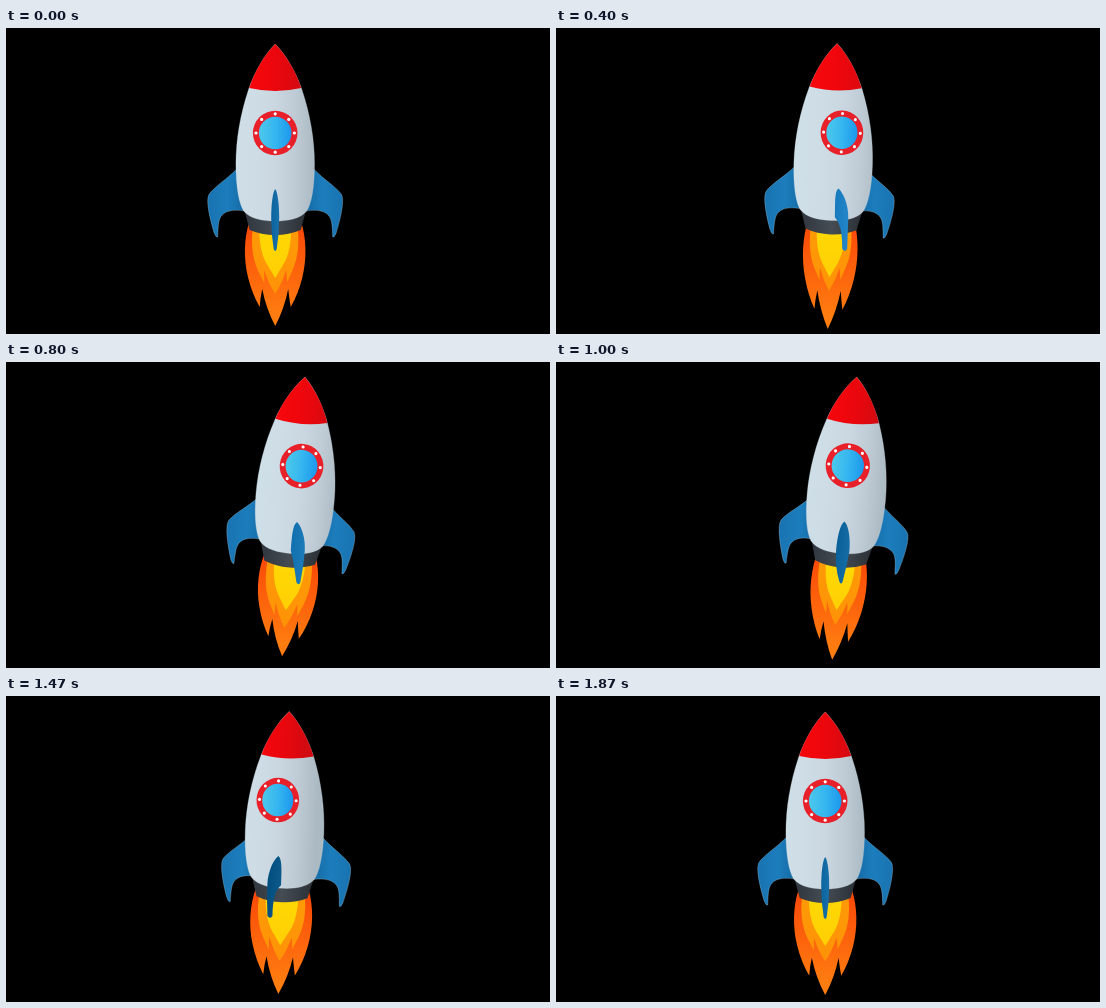
Animation of 544x306 px, one loop 1.94 s. Source, as an HTML page with a canvas:

```html
<!DOCTYPE html>
<html lang="en">
<head>
<meta charset="utf-8">
<title>Rocket</title>
<style>
html, body { margin: 0; width: 100%; height: 100%; overflow: hidden; background: #000; }
canvas { display: block; }
</style>
</head>
<body>
<canvas id="stage" width="544" height="306"></canvas>
<script>
const ctx = document.getElementById('stage').getContext('2d');
const LOOP = 1940, LAST = 28, TURN = 28.6;
const EDGE = 'rgba(205,220,230,.45)';

// Shapes are drawn around x = 0, the rocket's axis.
const hull = new Path2D('M0 16C-11 27-21 45-26.5 61C-35 86-39.3 112-39.3 136C-39.3 160-36 176-31.5 183C-25 191-12 193 0 193C12 193 25 191 31.5 183C36 176 39.3 160 39.3 136C39.3 112 35 86 26.5 61C21 45 11 27 0 16Z');
const nose = new Path2D('M0 16C-11 27-21 44-26 60Q0 66 26 60C21 44 11 27 0 16Z');
const skirt = new Path2D('M-31 182L-25.5 202Q-14 207 0 207Q14 207 25.5 202L31 182Z');
const wing = new Path2D('M-28 134L-38.5 141C-48 151-60 158-66 166C-70 172-65 192-61 205Q-59 210-57.5 209C-57 198-57 191-53 187C-48 182-40 181-24 184Z');
const flames = [
  ['M-26 194C-31 210-32 230-27 250Q-23 266-15.5 279Q-15 270-13 261Q-9 281 0 298Q9 281 13 261Q14 270 15.5 279Q23 266 27 250C32 230 31 210 26 194Z', '#fa4a08', '#ff7c10'],
  ['M-22 196C-24 212-24 228-17 243L-11 255L-11 242Q-7 255 0 266Q7 255 11 242L12 254L17 243C24 228 24 212 22 196Z', '#ff9a06', '#ff9008'],
  ['M-16 198C-16 214-14 226-9 235L0 250L9 235C14 226 16 214 16 198Z', '#ffd904', '#ffc806']
].map(([d, top, low]) => [new Path2D(d), top, low]);

// Flame flicker: step, width factor, tip height
const flicker = [[0, 1, 298], [6, .9, 301], [9, 1.05, 291], [15, .92, 298],
  [19, 1.08, 287], [22, 1.02, 298], [24, .98, 301], [28, 1.03, 299]];

function flameAt(n) {
  let i = 0;
  while (i < flicker.length - 2 && flicker[i + 1][0] <= n) i++;
  const a = flicker[i], b = flicker[i + 1];
  const k = (1 - Math.cos(Math.PI * (n - a[0]) / (b[0] - a[0]))) / 2;
  return [a[1] + (b[1] - a[1]) * k, a[2] + (b[2] - a[2]) * k];
}

function shade(x0, y0, x1, y1, ...stops) {
  const g = ctx.createLinearGradient(x0, y0, x1, y1);
  stops.forEach((c, i) => g.addColorStop(i / (stops.length - 1), c));
  return g;
}

function fill(path, paint, edge) {
  ctx.fillStyle = paint;
  ctx.fill(path);
  if (edge) {
    ctx.strokeStyle = EDGE;
    ctx.lineWidth = .6;
    ctx.stroke(path);
  }
}

function at(x, y, sx, sy, draw) {
  ctx.save();
  ctx.translate(x, y);
  ctx.scale(sx, sy);
  draw();
  ctx.restore();
}

function oval(x, y, rx, ry, paint) {
  ctx.beginPath();
  ctx.ellipse(x, y, rx, ry, 0, 0, 2 * Math.PI);
  ctx.fillStyle = paint;
  ctx.fill();
}

function porthole(x, squash) {
  at(x, 105, squash, 1, () => {
    oval(0, 0, 22.3, 22.3, '#e8202a');
    for (let i = 0; i < 8; i++) {
      const a = i * Math.PI / 4;
      oval(19.2 * Math.cos(a), 19.2 * Math.sin(a), 1.6, 1.6, '#fff');
    }
    oval(0, 0, 16.3, 16.3, shade(-16, 0, 16, 0, '#4cc8ea', '#36b6f0', '#1c98ec'));
  });
}

function centreFin(lean, roll) {
  const top = 1.2 * lean + 5.8 * roll, end = 4 * lean + 13.2 * roll;
  const mid = (top + end) / 2, turn = Math.abs(roll);
  const w = 4 + 2.5 * Math.sqrt(lean) + 1.2 * turn;
  const tip = 1.5 + turn;
  const fin = new Path2D();
  // The side turned away from the roll is cut in below the hull.
  const lower = (side, x, y) => {
    const cut = Math.max(0, -side * roll);
    fin.quadraticCurveTo(mid + side * w * (1 - 1.2 * cut), 206 - 9 * cut, x, y);
  };
  fin.moveTo(top, 161);
  fin.bezierCurveTo(top + w * .6, 164, mid + w, 176, mid + w, 190);
  lower(1, end + tip, 221);
  fin.quadraticCurveTo(end, 225, end - tip, 221);
  // Same lower edge, traced upwards
  const cut = Math.max(0, roll);
  fin.quadraticCurveTo(mid - w * (1 - 1.2 * cut), 206 - 9 * cut, mid - w, 190);
  fin.bezierCurveTo(mid - w, 176, top - w * .6, 164, top, 161);
  const tone = d => `rgb(${18 + 11 * roll + d},${106 + 23 * roll + d},${164 + 32 * roll + d})`;
  fill(fin, shade(mid - w, 0, mid + w, 0, tone(-6), tone(6)));
}

function draw(n) {
  const phase = 2 * Math.PI * (n % LAST) / TURN;
  const lean = (1 - Math.cos(phase)) / 2, roll = Math.sin(phase), turn = Math.abs(roll);
  const rise = 1.6 * lean;
  const [wide, tip] = flameAt(n);
  const long = (tip - 195 + rise) / 103;

  ctx.fillStyle = '#000';
  ctx.fillRect(0, 0, 544, 306);
  ctx.save();
  ctx.translate(269.2 + 15.7 * lean, 200 - rise);
  ctx.rotate(lean * Math.PI / 36);
  ctx.translate(0, -200);

  // The middle tongue stretches as the outer one shrinks.
  [long, 2 - long, 1].forEach((stretch, i) => at(0, 195, wide, stretch, () => {
    const [path, top, low] = flames[i];
    ctx.translate(0, -195);
    fill(path, shade(0, 200, 0, 285, top, low));
  }));
  fill(skirt, shade(-30, 0, 30, 0, '#30363d', '#454c54', '#2b3036'));
  const blue = shade(-67, 0, -28, 0, '#1973b1', '#1c7dbd', '#14679f');
  at(2.5 * lean - 2.8 * roll + 2 * turn, -1.5 * lean, 1, 1, () => fill(wing, blue, true));
  at(-2.7 * lean - 2.8 * roll - 1.5 * turn, 0, -1, 1, () => fill(wing, blue, true));

  const dx = 8 * roll;
  fill(hull, shade(-40 + dx, 0, 40 + dx, 0, '#cfdfe8', '#cddce5', '#cad7e0', '#becbd4', '#abb9c3'), true);
  fill(nose, shade(-27 + dx, 0, 27 + dx, 0, '#f5080e', '#f0060c', '#e4080e', '#d20a11'));
  porthole(8 * roll, 1 - .045 * turn);
  centreFin(lean, roll);
  ctx.restore();
}

// Fifteen poses a second, on times rounded to 10 ms
function tick() {
  const t = performance.now() % LOOP;
  draw(Math.min(LAST, Math.floor((Math.floor(t / 10) + .5) * .15)));
  requestAnimationFrame(tick);
}
tick();
</script>
</body>
</html>
```
